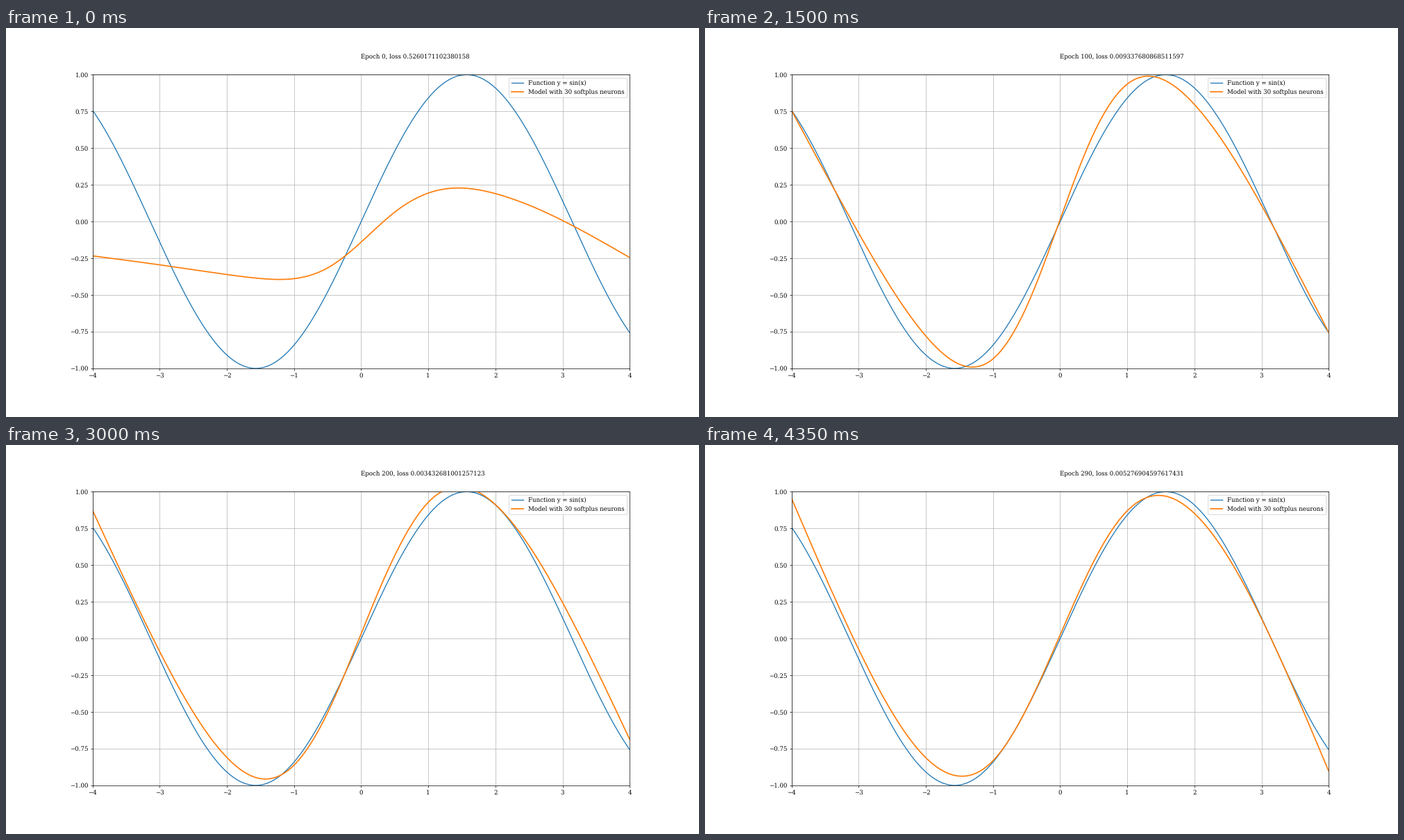
A matplotlib script for the animation above (4.5 s loop, 998 by 561 pixels).

```python
import numpy as np
import matplotlib.pyplot as plt
from matplotlib.animation import FuncAnimation

plt.rcParams.update({
    "font.family": "DejaVu Serif",
    "font.size": 10,
    "text.hinting": "none",
})

FRAMES, INTERVAL, EPOCH_STEP = 30, 150, 10

# Model output at the knots for a few training checkpoints
KNOTS = np.array([-4, -3, -2, -1.5, -1, -.5, 0, .5, 1, 1.5, 2, 3, 4])
CHECKPOINTS = [
    (0, 0.5260171102380158,
     [-.234, -.295, -.361, -.388, -.389, -.316, -.14, .064, .194, .228, .19, .007, -.245]),
    (40, 0.024380893859803715,
     [.69, -.045, -.69, -.903, -.922, -.615, 0, .6, .924, .937, .735, .05, -.77]),
    (100, 0.009337680868511597,
     [.755, -.08, -.78, -.972, -.935, -.58, .015, .6, .936, .973, .797, .11, -.755]),
    (150, 0.005827136951861576,
     [.74, -.155, -.855, -1.013, -.943, -.57, 0, .56, .93, 1.004, .868, .205, -.685]),
    (200, 0.003432681001257123,
     [.872, -.09, -.81, -.954, -.862, -.505, .034, .565, .928, 1.032, .912, .245, -.687]),
    (240, 0.002554305087232649,
     [.845, -.14, -.86, -.988, -.885, -.525, -.002, .515, .862, .963, .838, .125, -.88]),
    (290, 0.005276904597617431,
     [.953, -.075, -.812, -.937, -.832, -.478, .025, .525, .87, .974, .852, .135, -.903]),
]
EPOCHS = [c[0] for c in CHECKPOINTS]


def natural_spline(xk, yk, x):
    """Cubic spline with no curvature at either end."""
    n = len(xk)
    h = np.diff(xk)
    slope = np.diff(yk) / h
    a, b = np.eye(n), np.zeros(n)
    for i in range(1, n - 1):
        a[i, i - 1:i + 2] = h[i - 1], 2 * (h[i - 1] + h[i]), h[i]
        b[i] = 6 * (slope[i] - slope[i - 1])
    m = np.linalg.solve(a, b)
    i = np.clip(np.searchsorted(xk, x, side="right") - 1, 0, n - 2)
    t = x - xk[i]
    return (yk[i] + t * (slope[i] - h[i] * (2 * m[i] + m[i + 1]) / 6)
            + t**2 * m[i] / 2 + t**3 * (m[i + 1] - m[i]) / (6 * h[i]))


def training_state(epoch):
    """Loss and knot values at an epoch, blended between checkpoints."""
    i = int(np.searchsorted(EPOCHS, epoch, side="right")) - 1
    j = min(i + 1, len(EPOCHS) - 1)
    e0, loss0, y0 = CHECKPOINTS[i]
    e1, loss1, y1 = CHECKPOINTS[j]
    w = (epoch - e0) / max(e1 - e0, 1)
    if i == 0:  # fast early learning
        w = (1 - 0.05**w) / 0.95
    y0, y1 = np.array(y0), np.array(y1)
    return loss0 * (loss1 / loss0)**w, y0 + (y1 - y0) * w


fig, ax = plt.subplots(figsize=(16, 8.994), dpi=62.375)
fig.subplots_adjust(left=0.125, right=0.9, bottom=0.125, top=0.88)

x = np.linspace(-4, 4, 401)
ax.plot(x, np.sin(x), color="#1f77b4", lw=1.5, label="Function y = sin(x)")
model, = ax.plot([], [], color="#ff7f0e", lw=2, label="Model with 30 softplus neurons")
ax.set(xlim=(-4, 4), ylim=(-1, 1))
ax.grid(True)
ax.legend(loc="upper right")
caption = ax.text(0, 1.108, "")


def draw(frame):
    epoch = frame * EPOCH_STEP
    loss, values = training_state(epoch)
    model.set_data(x, natural_spline(KNOTS, values, x))
    caption.set_text(f"Epoch {epoch}, loss {loss}")
    return model, caption


anim = FuncAnimation(fig, draw, frames=FRAMES, interval=INTERVAL,
                     init_func=lambda: draw(0), repeat=True, repeat_delay=0)
plt.show()
```
